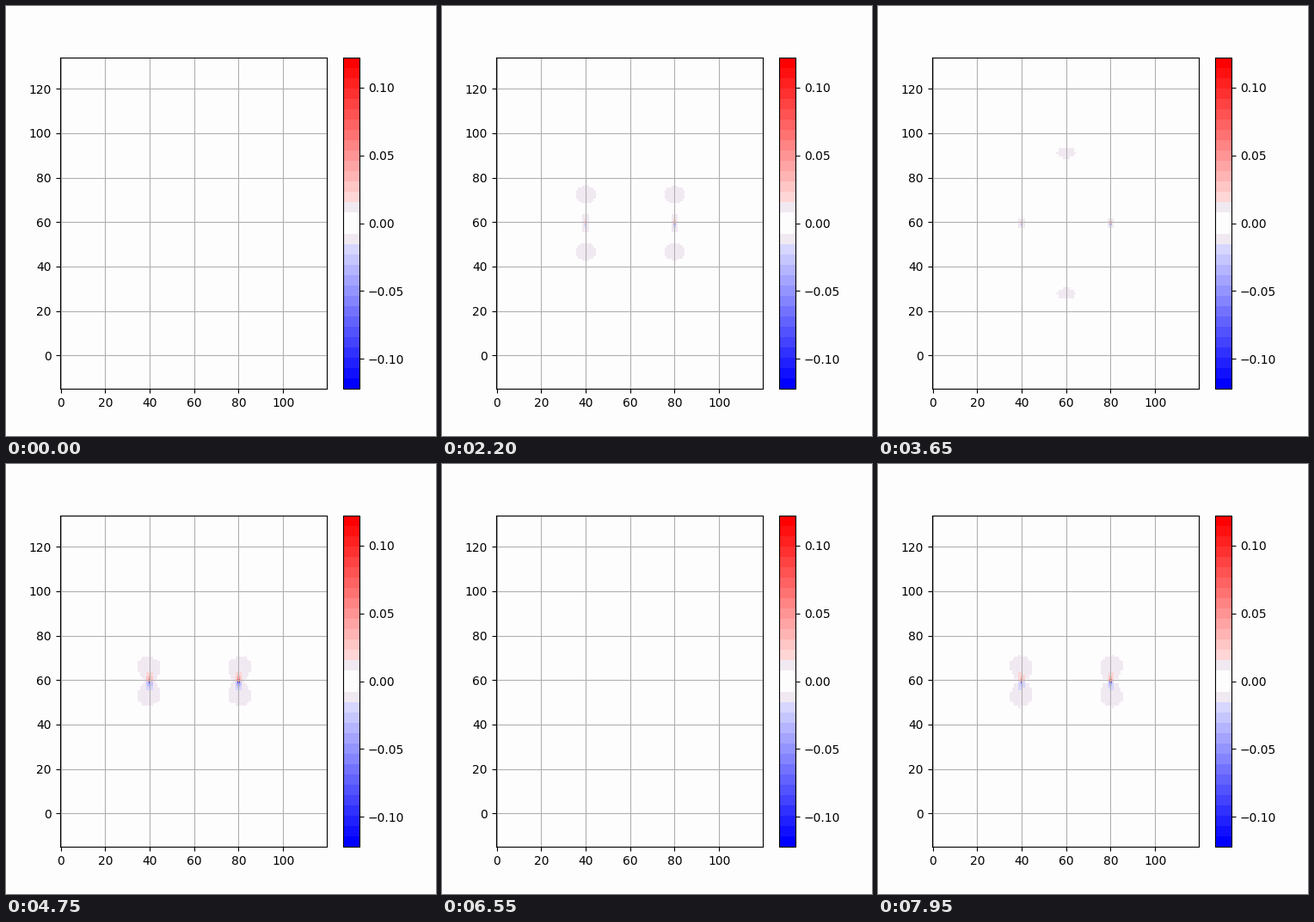
A matplotlib script for the animation above (8 s loop, 500 by 500 pixels).

```python
import numpy as np
import matplotlib.pyplot as plt
from matplotlib.animation import FuncAnimation
from matplotlib.colors import ListedColormap

N = 120                         # visible cells per side
PAD = 60                        # hidden margin, so that no echo returns
FRAMES = 160
COURANT = 0.705
PERIOD = 62                     # steps per oscillation
SOURCES = ([PAD + 60, PAD + 60], [PAD + 40, PAD + 80])  # rows, columns
VMAX = 0.122
BACK = "#fdfdfd"


def simulate():
    """Hx of two driven line sources in open space, one step per frame."""
    size = N + 2 * PAD
    ez, hx, hy = (np.zeros((size, size)) for _ in range(3))
    view = slice(PAD, PAD + N)
    fields = []
    for step in range(FRAMES):
        curl = np.diff(hy[1:-1, :-1], axis=1) - np.diff(hx[:-1, 1:-1], axis=0)
        ez[1:-1, 1:-1] += COURANT * curl
        ez[SOURCES[0], SOURCES[1]] = np.sin(2 * np.pi * step / PERIOD)
        hx[:-1] -= COURANT * np.diff(ez, axis=0)
        hy[:, :-1] += COURANT * np.diff(ez, axis=1)
        fields.append(hx[view, view].copy())
    fields = np.array(fields)
    # Scale by the strength of the first crest on the middle axis.
    crest = fields[73, 84:100, 60].max()
    return fields * 0.0079 / crest


def banded_map():
    """Blue-white-red in 32 bands with a neutral middle."""
    bands = plt.get_cmap("bwr")(np.linspace(0, 1, 32))
    bands[[14, 17], :3] = np.array([241, 233, 241]) / 255
    bands[15:17, :3] = 253 / 255
    return ListedColormap(bands)


fields = simulate()
cells = np.arange(N)

fig, ax = plt.subplots(figsize=(5, 5), dpi=100, facecolor=BACK)
ax.set_facecolor(BACK)
mesh = ax.pcolormesh(cells, cells, fields[0], cmap=banded_map(),
                     vmin=-VMAX, vmax=VMAX, shading="nearest")
fig.colorbar(mesh, ax=ax)
ax.set_aspect("equal", adjustable="datalim")
ax.grid(True)


def update(frame):
    mesh.set_array(fields[frame])
    return (mesh,)


anim = FuncAnimation(fig, update, frames=FRAMES, interval=50,
                     repeat=True, repeat_delay=0, blit=False)
plt.show()
```
